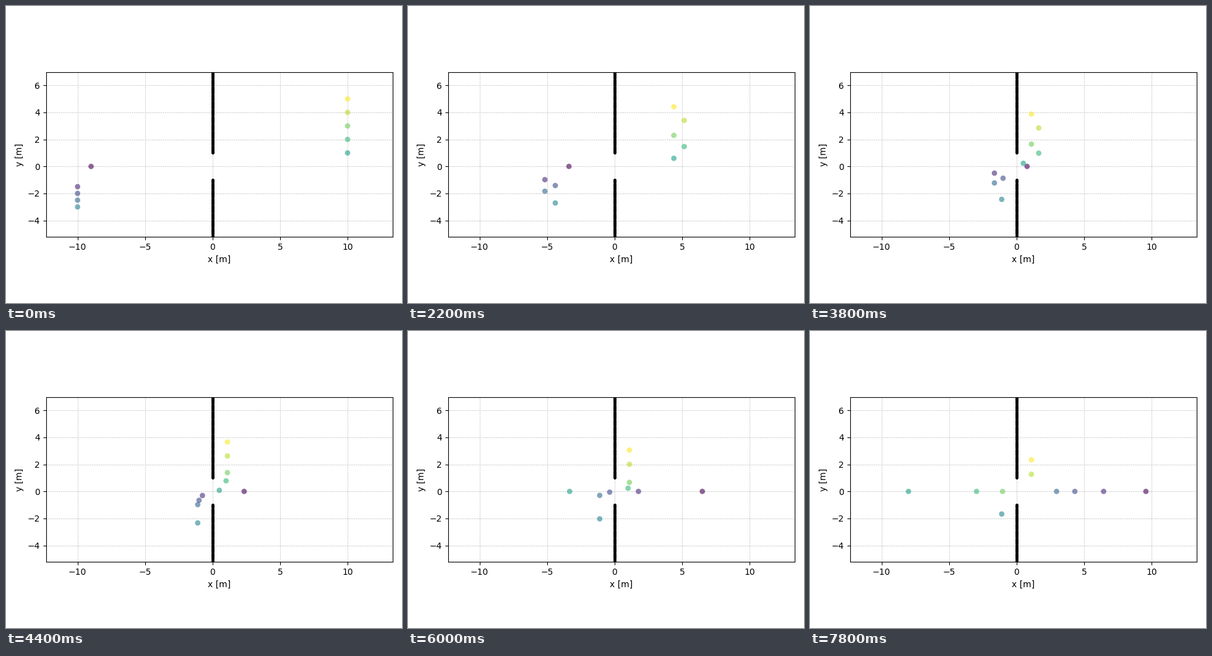
These frames come from a looping animation (640x480 px, 8000 ms). A matplotlib script:

```python
import numpy as np
import matplotlib.pyplot as plt
from matplotlib.animation import FuncAnimation

W, H = 640, 480
SCALE = 21.82                      # pixels per metre
ORIGIN = 333.85, 259.25            # pixel position of (0, 0)
LEFT, RIGHT, TOP, BOTTOM = 64.7, 625.0, 107.1, 373.3
FRAMES, INTERVAL = 40, 200

FAST, SLOW, EXIT = 0.51, 0.44, 0.52   # metres per frame
QUEUE = 1.1                        # waiting distance from the wall
GOAL = 9.58

# Two groups of five walk towards each other through a gate at (0, 0).
rank = np.tile(np.arange(5), 2)
side = np.repeat([1, -1], 5)       # walking direction along x
start_x = np.where((side > 0) & (rank == 0), 9, 10)
start_y = np.where(side > 0, -1 - 0.5 * rank, rank + 1)
start_y[0] = 0
pace = np.where(rank % 2 == 0, FAST, SLOW)

# Frame at which each walker gets its turn to cross.
turn = np.array([17.5, 26.6, 30.7, 33.3, 77, 23.6, 33.3, 37, 53.6, 66])


def positions(t):
    """Walk up to the wall, slide along it, then leave through the gate."""
    wait = -np.minimum(QUEUE, 0.5 * np.abs(start_y))
    approach = np.minimum(pace * t - start_x, wait)
    leave = EXIT * (t - turn)
    x = side * np.clip(np.maximum(approach, leave), -start_x, GOAL)
    y = start_y * (1 - np.minimum(t / turn, 1) ** 1.2)
    return np.column_stack([x, y])


fig = plt.figure(figsize=(W / 100, H / 100), dpi=100)
ax = fig.add_axes([LEFT / W, 1 - BOTTOM / H, (RIGHT - LEFT) / W, (BOTTOM - TOP) / H])
ax.set_xlim((LEFT - ORIGIN[0]) / SCALE, (RIGHT - ORIGIN[0]) / SCALE)
ax.set_ylim((ORIGIN[1] - BOTTOM) / SCALE, (ORIGIN[1] - TOP) / SCALE)
ax.set_xticks(range(-10, 11, 5))
ax.set_yticks(range(-4, 7, 2))
ax.grid(linestyle="dotted")
ax.set_axisbelow(True)
ax.set_xlabel("x [m]")
ax.set_ylabel("y [m]")

wall = np.linspace(1, 10, 91)
for sign in (-1, 1):
    ax.plot(0 * wall, sign * wall, "o", color="black", markersize=2.5)

walkers = []
for i, start in enumerate(positions(0)):
    dot = plt.Circle(start, 0.2, facecolor=plt.cm.viridis(i / 9), alpha=0.6, zorder=3)
    walkers.append(ax.add_patch(dot))


def update(frame):
    for dot, place in zip(walkers, positions(frame)):
        dot.center = place
    return walkers


anim = FuncAnimation(fig, update, frames=FRAMES, interval=INTERVAL,
                     repeat=True, repeat_delay=0)
plt.show()
```
